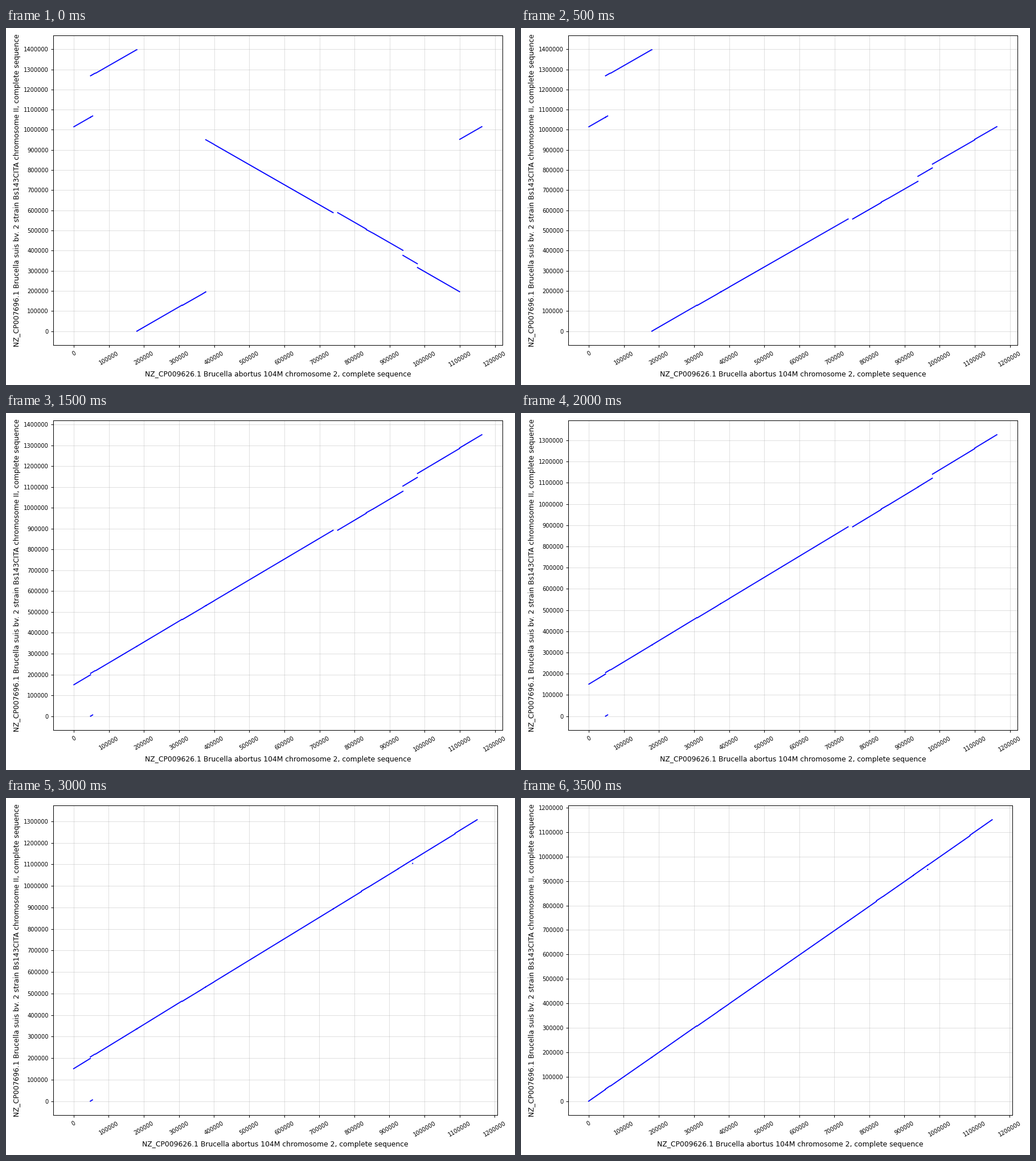
A matplotlib script that plays this animation: 894x626 px, repeating every 4 s.

```python
import numpy as np
import matplotlib.pyplot as plt
from matplotlib.animation import FuncAnimation

W, H, DPI = 894, 626, 64
K = 89.4 / DPI  # point scale for a 10 x 7 inch layout
STEP = 100_000

# Aligned stretches in kilobases: (x, y) points with both genomes in order
HEAD = [(0, 0), (47.5, 47.5)]
TAIL = [(47.5, 47.5), (53.5, 53.5)]
BODY = [
    [(47.5, 253), (60, 265.5), (62.5, 266.3), (178, 381.5), (179.5, 382.5)],
    [(179.5, 383), (307.5, 511.5)],
    [(309.5, 511.5), (365, 566.5), (371, 573), (376, 578)],
    [(376, 578), (399, 600.5), (400.5, 602.5), (739, 940)],
    [(752, 940), (833, 1021)],
    [(833.5, 1024), (850, 1039.5), (853, 1042), (938, 1127)],
    [(938, 1152), (979, 1193.5)],
    [(979.5, 1212.5), (1099.5, 1332.5)],
    [(1100, 1335.5), (1163, 1398.5)],
]
SPECK = [(979, 1104.5), (979.2, 1104.7)]


def shift(seg, dx=0, dy=0):
    return np.array(seg, float) + (dx, dy)


def rotated(seg):
    """Move the start of the second genome."""
    return shift(seg, dy=1015 if seg[0][1] < 382.8 else -383)


def inverted(seg):
    """Flip the large middle block after rotation."""
    out = rotated(seg)
    if 376 <= seg[0][0] < 1100:
        out[:, 1] = 1145.5 - out[:, 1]
    return out


def edited(seg, step):
    """Apply the cuts made up to the given step."""
    x = seg[0][0]
    dy = -47.5
    if step >= 4 and x >= 938:
        dy -= 24.5
    if step >= 5 and x > 979:
        dy -= 19
    if step >= 7:
        dy -= 156.5
    dx = -13 if step >= 6 and x >= 752 else 0
    return shift(seg, dx, dy)


def segments(step):
    whole = [HEAD, TAIL] + BODY
    if step == 0:
        return [inverted(s) for s in whole]
    if step == 1:
        return [rotated(s) for s in whole]
    if step == 2:
        return [shift(s) for s in whole]
    segs = [edited(s, step) for s in BODY]
    segs.append(shift(HEAD, dy=151 if step < 7 else 0))
    if step < 7:
        segs.append(shift(TAIL, dy=-47.5))
    if step >= 5:
        segs.append(shift(SPECK, -13 if step >= 6 else 0,
                          -156.5 if step == 7 else 0))
    return segs


def scale_axis(set_lim, set_ticks, top):
    margin = 0.05 * top
    set_lim(-margin, top + margin)
    set_ticks(np.arange(0, top + margin, STEP))


fig = plt.figure(figsize=(W / DPI, H / DPI), dpi=DPI, facecolor="white")
ax = fig.add_axes([0, 0, 1, 1])
line, = ax.plot([], [], color="blue", lw=1.5 * K)
ax.grid(color="#b0b0b0", alpha=0.4, lw=0.8 * K)
ax.tick_params(labelsize=8 * K, length=3.5 * K, width=0.8 * K, pad=3.5 * K)
ax.tick_params(axis="x", labelrotation=30)
ax.ticklabel_format(style="plain", useOffset=False)
for spine in ax.spines.values():
    spine.set_linewidth(0.8 * K)
label = dict(fontsize=10 * K, labelpad=4 * K, family="DejaVu Sans")
ax.set_xlabel("NZ_CP009626.1 Brucella abortus 104M chromosome 2, "
              "complete sequence", **label)
ax.set_ylabel("NZ_CP007696.1 Brucella suis bv. 2 strain Bs143CITA "
              "chromosome II, complete sequence", **label)


def draw(step):
    gap = [(np.nan, np.nan)]
    pts = np.vstack([np.vstack([s, gap]) for s in segments(step)]) * 1000
    line.set_data(pts[:, 0], pts[:, 1])
    right = 871.6 if step < 6 else 863
    left, top, bottom = 83.4, 13.4, 556.3
    ax.set_position([left / W, 1 - bottom / H,
                     (right - left) / W, (bottom - top) / H])
    x_top, y_top = np.nanmax(pts, axis=0)
    scale_axis(ax.set_xlim, ax.set_xticks, x_top)
    scale_axis(ax.set_ylim, ax.set_yticks, y_top)
    return line,


anim = FuncAnimation(fig, draw, frames=8, interval=500, repeat=True)
plt.show()
```
